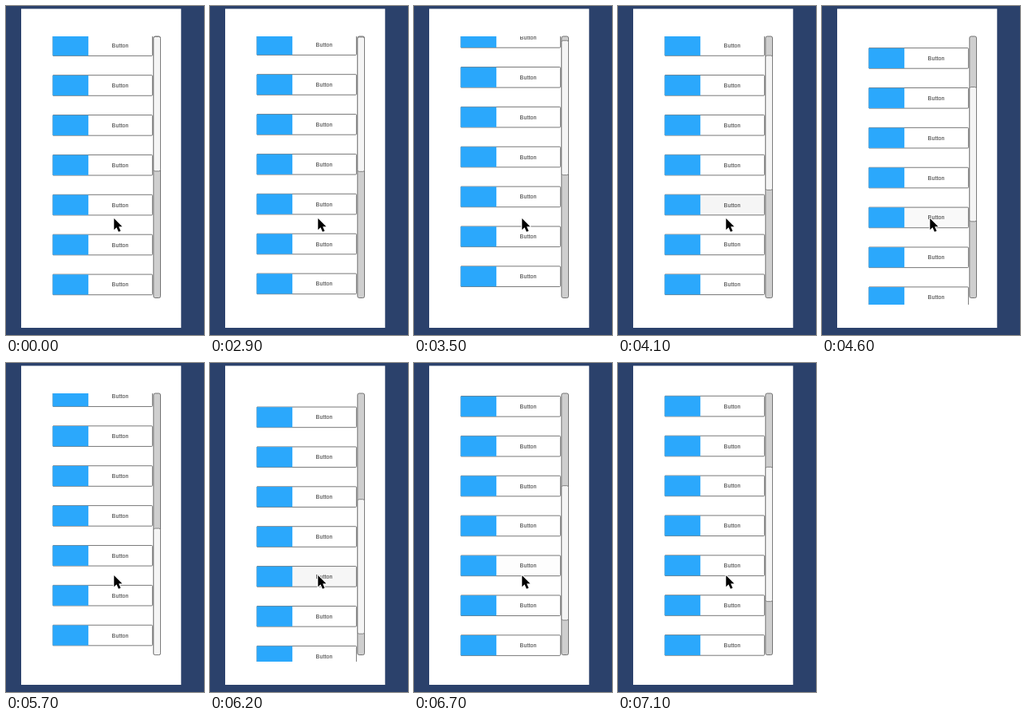
An HTML page with a canvas for the animation above (7200 ms loop, 248 by 412 pixels).

```html
<!DOCTYPE html>
<html lang="en">
<head>
<meta charset="utf-8">
<title>Scroll list</title>
<style>
html, body { margin: 0; width: 100%; height: 100%; overflow: hidden; background: #2b416b; }
canvas { display: block; width: 248px; height: 412px; }
</style>
</head>
<body>
<canvas id="stage"></canvas>
<script>
const W = 248, H = 412, LOOP = 7200, STEP = 100;
const VIEW = { x: 58, y: 38, w: 126, h: 336 };
const ITEMS = 14, PITCH = 49.88, ITEM_H = 25.6, MAX_SCROLL = 338;
const BAR = { x: 184.8, y: 38, w: 8.7, h: 327.5, handle: 168.4 };
const POINTER = { x: 135, y: 265.5 }, FADE = 150;

// time (ms), scroll (px), speed (px/s)
const KEYS = [
  [2900, 2, 8],
  [4100, 51, 110],
  [5000, 221.7, 215],
  [5700, 358, 0],
  [6200, 282, -110],
  [7100, 196, -200]
];

const canvas = document.getElementById('stage');
const ctx = canvas.getContext('2d');
const dpr = window.devicePixelRatio || 1;
canvas.width = W * dpr;
canvas.height = H * dpr;
ctx.scale(dpr, dpr);

function scrollAt(t) {
  if (t < KEYS[0][0]) return 1;
  for (let i = 1; i < KEYS.length; i++) {
    const [t0, a, va] = KEYS[i - 1], [t1, b, vb] = KEYS[i];
    if (t > t1) continue;
    const d = (t1 - t0) / 1000, u = (t - t0) / (t1 - t0), u2 = u * u, u3 = u2 * u;
    return a * (2 * u3 - 3 * u2 + 1) + b * (3 * u2 - 2 * u3) +
      d * (va * (u3 - 2 * u2 + u) + vb * (u3 - u2));
  }
  return KEYS[KEYS.length - 1][1];
}

const itemTop = (i, scroll) => VIEW.y + i * PITCH - scroll - 0.2;

// Share of the fade window during which the pointer was over the item
function hoverLevel(i, t) {
  const n = 15;
  let hits = 0;
  for (let k = 0; k < n; k++) {
    const y = POINTER.y - itemTop(i, scrollAt(t - (k + 0.5) * FADE / n));
    if (y > 0 && y < ITEM_H) hits++;
  }
  return hits / n;
}

function roundRect(x, y, w, h, r, fill, stroke, line) {
  ctx.beginPath();
  ctx.roundRect(x, y, w, h, r);
  ctx.fillStyle = fill;
  ctx.fill();
  ctx.strokeStyle = stroke;
  ctx.lineWidth = line;
  ctx.stroke();
}

function drawItem(i, t, scroll) {
  const y = itemTop(i, scroll);
  if (y > VIEW.y + VIEW.h || y + ITEM_H < VIEW.y - 1) return;
  const g = Math.round(255 - 13 * hoverLevel(i, t));
  roundRect(59, y, 124.4, ITEM_H, [0, 1, 1, 0], `rgb(${g},${g},${g})`, '#555', 0.8);
  ctx.fillStyle = '#2ba8fc';
  ctx.fillRect(58.5, y + 0.2, 44.7, ITEM_H - 0.4);
  ctx.fillStyle = '#323232';
  ctx.fillText('Button', 143, y + ITEM_H / 2 + 2.5);
}

function drawBar(scroll) {
  const over = Math.max(0, -scroll, scroll - MAX_SCROLL);
  const size = BAR.handle - over * 0.5;
  const pos = Math.min(1, Math.max(0, scroll / MAX_SCROLL));
  roundRect(BAR.x, BAR.y, BAR.w, BAR.h, 2, '#cfcfcf', '#666', 0.9);
  roundRect(BAR.x, BAR.y + pos * (BAR.h - size), BAR.w, size, 2, '#f5f5f5', '#777', 0.9);
}

function drawPointer() {
  const pts = [[0, 0], [0, 14.2], [3.2, 11.2], [5.7, 16.8], [8.3, 15.7], [5.9, 10.2], [10.2, 10.2]];
  ctx.beginPath();
  pts.forEach(([x, y]) => ctx.lineTo(POINTER.x + 0.3 + x, POINTER.y + 0.5 + y));
  ctx.closePath();
  ctx.lineJoin = 'round';
  ctx.strokeStyle = '#fff';
  ctx.lineWidth = 2;
  ctx.stroke();
  ctx.fillStyle = '#000';
  ctx.fill();
}

function draw(t) {
  const scroll = scrollAt(t);
  ctx.fillStyle = '#2b416b';
  ctx.fillRect(0, 0, W, H);
  ctx.fillStyle = '#fff';
  ctx.fillRect(19, 3.5, 200.3, 399.5);

  ctx.save();
  ctx.beginPath();
  ctx.rect(VIEW.x, VIEW.y, VIEW.w, VIEW.h);
  ctx.clip();
  ctx.font = '7.2px "Liberation Sans", Arial, sans-serif';
  ctx.textAlign = 'center';
  for (let i = 0; i < ITEMS; i++) drawItem(i, t, scroll);
  ctx.restore();

  drawBar(scroll);
  drawPointer();
}

const start = performance.now();
function frame() {
  const t = (performance.now() - start) % LOOP;
  draw(Math.floor(t / STEP) * STEP);
  requestAnimationFrame(frame);
}
frame();
</script>
</body>
</html>
```
